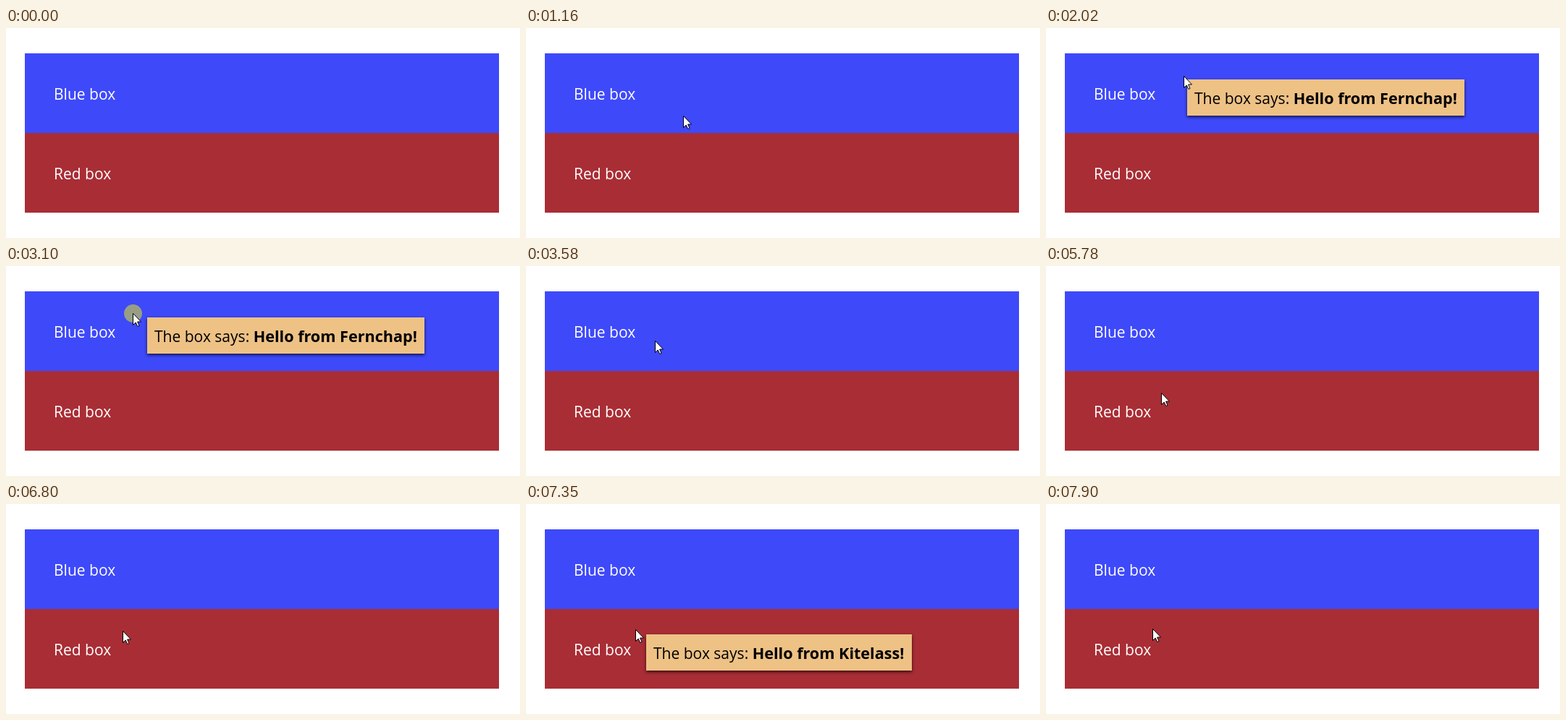
These frames come from a looping animation (710x290 px, 8 s). An HTML page:

```html
<!DOCTYPE html>
<html lang="en">
<head>
<meta charset="utf-8">
<title>Tooltip on click</title>
<style>
  html, body { margin: 0; width: 100%; height: 100%; overflow: hidden; background: #fff; }
  svg { display: block; width: 100%; height: 100%; }
  text { font: 21px "Open Sans", "Noto Sans", sans-serif; fill: #fff; }
  #tip text { fill: #000; }
  #tip tspan { font-weight: 700; font-size: 21.6px; }
  #tip rect { fill: #eec185; filter: drop-shadow(0 2px 2px rgba(0, 0, 0, .7)); }
</style>
</head>
<body>
<svg viewBox="0 0 710 290">
  <rect x="26" y="35" width="655" height="110" fill="#3e49fa"/>
  <rect x="26" y="145" width="655" height="110" fill="#a92d35"/>
  <text x="66" y="99">Blue box</text>
  <text x="66" y="209">Red box</text>
  <g id="tip">
    <rect height="50"/>
    <text x="10" y="34">The box says: <tspan id="words"></tspan></text>
  </g>
  <g id="mouse">
    <circle id="click" cx=".5" cy=".5" r="12.5" fill="#ff0" fill-opacity=".47"/>
    <path d="M.5 .5V16.5L4.2 13L6.8 18.5L9 17.5L6.6 12H11.5Z" fill="#fff" stroke="#000"/>
  </g>
</svg>
<script>
  const LOOP = 8000;
  const el = id => document.getElementById(id);
  const tip = el("tip"), mouse = el("mouse"), click = el("click"), words = el("words");
  const tipBox = tip.querySelector("rect");

  const smooth = p => p * p * (3 - 2 * p);
  const lateSmooth = p => smooth(p ** 1.32);
  const easeOut = q => p => 1 - (1 - p) ** q;

  // The pointer is sampled in equal steps between the times from and to.
  const start = [574, 296];
  const moves = [
    { from: 520, to: 1320, steps: 11, x: 200, y: 92, easeX: easeOut(1.813), easeY: easeOut(1.144) },
    { from: 1400, to: 1480, steps: 2, x: 196, y: 84 },
    { from: 1630, to: 1710, steps: 2, x: 190, y: 66 },
    { from: 2640, to: 2950, steps: 5, x: 175, y: 65 },
    { from: 3340, to: 3900, steps: 8, x: 183, y: 172, easeX: lateSmooth, easeY: lateSmooth },
    { from: 4840, to: 5320, steps: 7, x: 159, y: 175 },
    { from: 6330, to: 6330, steps: 1, x: 160, y: 175 },
    { from: 6480, to: 6480, steps: 1, x: 161, y: 175 },
    { from: 7270, to: 7430, steps: 3, x: 147, y: 172 }
  ];
  const clicks = [[1860, 2020], [3100, 3180], [4140, 4290], [5620, 5780], [6720, 6800], [7820, 7900]];

  const blue = { width: 383, words: "Hello from Fernchap!" };
  const red = { width: 367, words: "Hello from Kitelass!" };
  const tips = [
    { from: 2020, to: 3180, x: 195, y: 71, box: blue },
    { from: 4290, to: 5780, x: 188, y: 177, box: red },
    { from: 6880, to: 7900, x: 166, y: 180, box: red }
  ];

  function pointerAt(t) {
    let [x, y] = start;
    for (const m of moves) {
      if (t < m.from) break;
      const gap = (m.to - m.from) / (m.steps - 1);
      const done = t >= m.to ? m.steps : Math.floor((t - m.from) / gap) + 1;
      const p = done / m.steps;
      x += (m.x - x) * (m.easeX || smooth)(p);
      y += (m.y - y) * (m.easeY || smooth)(p);
    }
    return [Math.round(x), Math.round(y)];
  }

  const show = (node, on) => node.setAttribute("visibility", on ? "visible" : "hidden");
  const place = (node, x, y) => node.setAttribute("transform", `translate(${x} ${y})`);

  function draw(t) {
    place(mouse, ...pointerAt(t));
    show(click, clicks.some(([on, off]) => t >= on && t < off));
    const open = tips.find(s => t >= s.from && t < s.to);
    show(tip, open);
    if (open) {
      place(tip, open.x, open.y);
      tipBox.setAttribute("width", open.box.width);
      words.textContent = open.box.words;
    }
  }

  const begin = performance.now();
  function frame() {
    draw((performance.now() - begin) % LOOP);
    requestAnimationFrame(frame);
  }
  frame();
</script>
</body>
</html>
```
